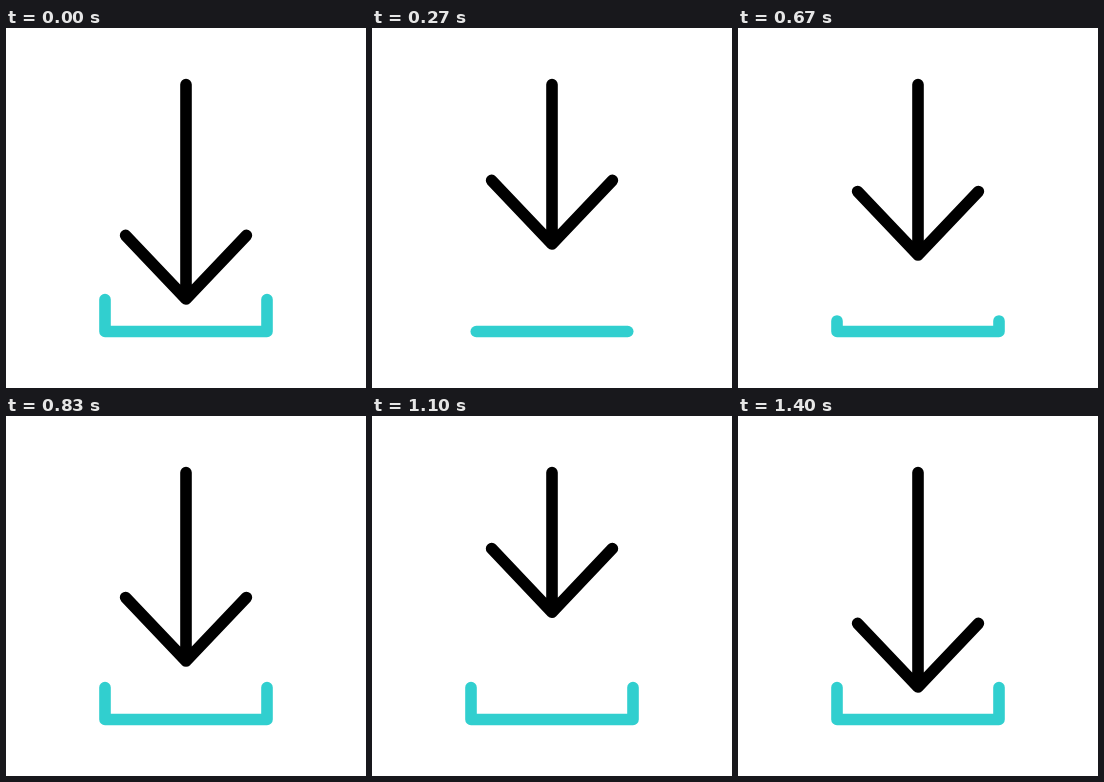
Animation, 360 px wide and 360 px high, one loop 2000 ms. Source, as an HTML page:

```html
<!DOCTYPE html>
<html lang="en">
<head>
<meta charset="utf-8">
<title>Download</title>
<style>
  html, body { margin: 0; height: 100%; overflow: hidden; background: #fff; }
  svg { display: block; width: 100vw; height: 100vh; }
  path { fill: none; stroke-width: 11.6; stroke-linecap: round; stroke-linejoin: round; }
</style>
</head>
<body>
<svg viewBox="0 0 360 360">
  <path id="tray" stroke="#31cfcf"/>
  <path id="arrow" stroke="#000"/>
</svg>
<script>
const LOOP = 60, FPS = 30;
const tray = document.getElementById('tray');
const arrow = document.getElementById('arrow');

// Keyframes as [step, value]
const LIFT = [[0, 0], [15, 100], [23, 18], [31.75, 78], [42, 0]];
const HALF_LENGTH = [[0, 113], [15, 45.2], [23, 113]];

function valueAt(keys, step) {
  const next = keys.findIndex(([at]) => at > step);
  if (next < 0) return keys[keys.length - 1][1];
  const [start, from] = keys[next - 1];
  const [end, to] = keys[next];
  const p = (step - start) / (end - start);
  return from + (to - from) * p * p * (3 - 2 * p);
}

function draw(ms) {
  const step = Math.floor(ms * FPS / 1000 + 0.11) % LOOP;

  const tip = 271 - valueAt(LIFT, step);
  const barb = tip - 63.6;
  arrow.setAttribute('d', `M180 56.6V${tip}M119.6 ${barb}L180 ${tip}L240.4 ${barb}`);

  // The line shrinks from both ends, sides first
  const half = valueAt(HALF_LENGTH, step);
  const x = Math.min(half, 81);
  const top = 303.5 - Math.max(0, half - 81);
  tray.setAttribute('d', `M${180 - x} ${top}V303.5H${180 + x}V${top}`);
}

const begin = performance.now();
function tick() {
  draw(performance.now() - begin);
  requestAnimationFrame(tick);
}
tick();
</script>
</body>
</html>
```
